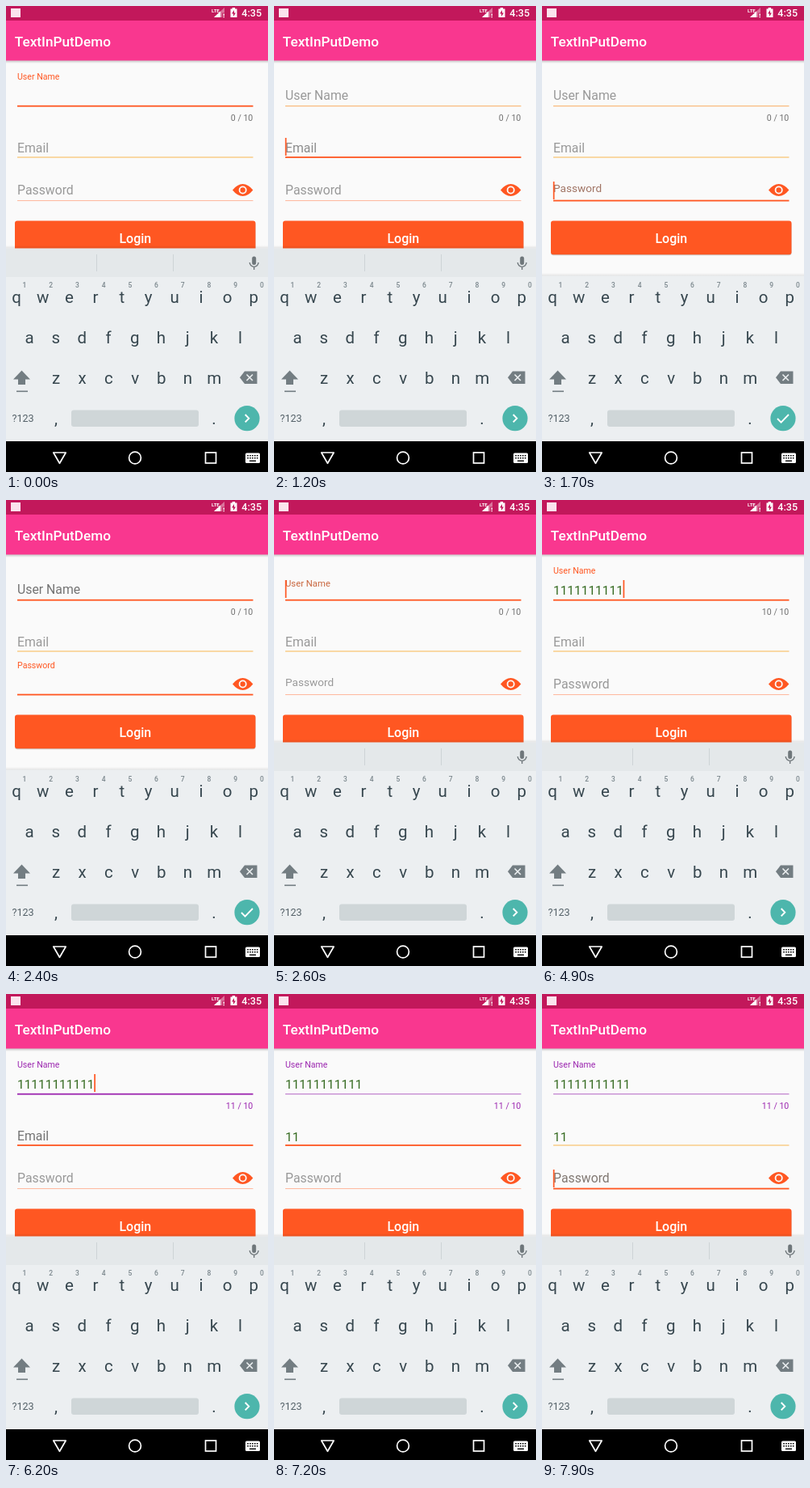
Animation, 325 px wide and 576 px high, one loop 8 s. Source, as an HTML page:

```html
<!DOCTYPE html>
<html lang="en">
<head>
<meta charset="utf-8">
<title>Text input demo</title>
<style>
html, body { margin: 0; width: 100%; height: 100%; overflow: hidden; background: #fafafa; }
svg { display: block; width: 325px; height: 576px; font-family: Roboto, "Noto Sans", sans-serif; }
.mid { text-anchor: middle; }
.key { font-size: 20.5px; fill: #37474f; text-anchor: middle; }
.num { font-size: 8.5px; font-weight: 500; fill: #7b878d; text-anchor: middle; }
.typed { font-size: 15.46px; fill: #33691e; }
</style>
</head>
<body>
<svg viewBox="0 0 325 576">
  <defs>
    <linearGradient id="down" x2="0" y2="1">
      <stop stop-color="#000" stop-opacity=".2"/><stop offset="1" stop-color="#000" stop-opacity="0"/>
    </linearGradient>
    <linearGradient id="up" x2="0" y2="1">
      <stop stop-color="#000" stop-opacity="0"/><stop offset="1" stop-color="#000" stop-opacity=".1"/>
    </linearGradient>
  </defs>
  <rect width="325" height="576" fill="#fafafa"/>

  <!-- status bar and title -->
  <rect width="325" height="18" fill="#c2185b"/>
  <rect x="6" y="3" width="12" height="11" fill="#fbe3ed"/>
  <g fill="#fff">
    <text x="255" y="7.5" font-size="6" font-weight="700">LTE</text>
    <path d="M258 14L271 2V14Z" fill-opacity=".4"/>
    <path d="M258 14L266 6.6V14Z"/>
    <path d="M268.2 8.5h3.3v6h-3.3z" fill="#c2185b"/>
    <path d="M269.5 9.5h1.4v2.7h-1.4zM269.5 13h1.4v1.2h-1.4z"/>
    <path d="M278.5 3.5h2.2V2h3.4v1.5h2.4V14h-8z"/>
    <path d="M283 5l-3 4.4h2V13l3-4.6h-2z" fill="#c2185b"/>
    <text x="292.3" y="13.3" font-size="12.6" font-weight="500">4:35</text>
  </g>
  <rect y="18" width="325" height="49.5" fill="#f9378f"/>
  <rect y="67.5" width="325" height="3.5" fill="url(#down)"/>
  <text x="10.8" y="50" font-size="17.2" font-weight="500" fill="#fff">TextInPutDemo</text>

  <!-- form -->
  <g id="form"></g>
  <text id="count" x="306.3" y="142" font-size="10.6" text-anchor="end"></text>
  <path d="M281 227.5Q287 220 293.7 220T306.4 227.5Q300.4 235 293.7 235T281 227.5Z" fill="#ff5722"/>
  <circle cx="293.7" cy="227.5" r="4.1" fill="#ff5722" stroke="#fafafa" stroke-width="1.8"/>
  <rect x="11" y="267" width="298.5" height="41.3" rx="3" fill="#000" opacity=".2"/>
  <rect x="11" y="265.5" width="298.5" height="41.7" rx="3" fill="#ff5722"/>
  <text class="mid" x="160.3" y="293" font-size="16" font-weight="500" fill="#fff">Login</text>

  <!-- keyboard -->
  <rect y="330" width="325" height="4" fill="url(#up)"/>
  <rect y="333.5" width="325" height="205" fill="#eceff1"/>
  <g id="bar">
    <rect y="296" width="325" height="3.5" fill="url(#up)"/>
    <rect y="299.5" width="325" height="35.5" fill="#e4e8ea"/>
    <path d="M112.5 307v21M207.5 307v21" stroke="#cdd3d6"/>
    <rect x="305.2" y="309.5" width="5" height="10.5" rx="2.5" fill="#6f777b"/>
    <path d="M302.3 317a5.4 5.4 0 0 0 10.8 0M307.7 322.4v3.6" fill="none" stroke="#6f777b" stroke-width="1.4"/>
  </g>
  <g id="keys"></g>
  <path d="M19.5 450.5L30 461.5H24V468H15V461.5H9Z" fill="#737d82"/>
  <path d="M13 476.3h14" stroke="#737d82" stroke-width="1.6"/>
  <path d="M296 451.5h15.5v15.5H296l-6-7.75z" fill="#737d82"/>
  <path d="M298.5 455.5l7.5 7.5m0-7.5l-7.5 7.5" stroke="#eceff1" stroke-width="1.6"/>
  <text x="7.5" y="514.3" font-size="12.6" fill="#546168">?123</text>
  <rect x="81" y="499.5" width="158" height="20.5" rx="3" fill="#cfd6d8"/>
  <circle cx="299" cy="509.7" r="15.6" fill="#4db6ac"/>
  <path id="enter" fill="none" stroke="#fff" stroke-width="1.9"/>

  <!-- navigation -->
  <rect y="538" width="325" height="38" fill="#000"/>
  <g fill="none" stroke="#fff" stroke-width="1.7">
    <path d="M58.8 552h15.4l-7.7 13.3z" stroke-linejoin="round"/>
    <circle cx="160" cy="558.5" r="7.4"/>
    <rect x="247.5" y="552" width="13" height="13"/>
  </g>
  <rect x="297" y="552.5" width="18" height="12.5" rx="1.5" fill="#fff"/>
  <path d="M299.3 555.7h13.5M299.3 558.8h13.5" stroke="#000" stroke-width="1.5" stroke-dasharray="1.6 1.3"/>
  <path d="M302 562.3h8" stroke="#000" stroke-width="1.4"/>
</svg>
<script>
const LOOP = 8000, LEFT = 14, DIGIT = 8.68;
const ACCENT = '#ff5722', GREY = '#999', DARK = '#737373', PURPLE = '#9c27b0';
const byId = id => document.getElementById(id);

function add(parent, tag, attrs, text = '') {
  const el = document.createElementNS('http://www.w3.org/2000/svg', tag);
  set(el, attrs);
  el.textContent = text;
  parent.append(el);
  return el;
}
function set(el, attrs) {
  for (const k in attrs) el.setAttribute(k, attrs[k]);
}

// keyboard letters
const PITCH = 32.7;
[['qwertyuiop', 13, 366.5], ['asdfghjkl', 29, 416.7], ['zxcvbnm', 62, 466.7]].forEach(([row, x0, y], r) =>
  [...row].forEach((c, i) => {
    const x = x0 + i * PITCH;
    add(byId('keys'), 'text', { class: 'key', x, y }, c);
    if (r === 0) add(byId('keys'), 'text', { class: 'num', x: x + 10, y: 348 }, (i + 1) % 10);
  }));
add(byId('keys'), 'text', { class: 'key', x: 62, y: 516.5 }, ',');
add(byId('keys'), 'text', { class: 'key', x: 258, y: 516.5 }, '.');

// form fields
function field(name, base, line, caretTop, thin) {
  const form = byId('form');
  return {
    base, line, thin,
    label: add(form, 'text', { x: LEFT }, name),
    rule: add(form, 'rect', { x: LEFT, width: 292.5 }),
    typed: add(form, 'text', { class: 'typed', x: LEFT, y: base + .7 }),
    caret: add(form, 'rect', { y: caretTop, width: 1.7, height: 22, fill: ACCENT })
  };
}
const fields = {
  user: field('User Name', 116, 123.7, 99, '#f9ac60'),
  mail: field('Email', 180.8, 187, 163, '#f9b850'),
  pass: field('Password', 233, 240.6, 217, '#ffb59b')
};

// label poses: [font size, rise above resting baseline]
const REST = [15.8, 0], LOW = [13.6, 3], HIGH = [11.3, 9], TOP = [10.6, 25];

// each row changes part of the state from its time on
const steps = [
  [0, { caret: '', focus: 'user', user: TOP, mail: REST, pass: REST, userInk: ACCENT, mailInk: GREY,
        passInk: GREY, n: 0, m: 0, bar: true }],
  [200, { caret: 'user' }],
  [600, { caret: '' }],
  [1000, { caret: 'user' }],
  [1100, { focus: 'user mail', user: LOW, userInk: '#b08070', mailInk: DARK }],
  [1200, { caret: 'mail', focus: 'mail', user: REST, userInk: GREY, mailInk: '#8c8c8c' }],
  [1500, { focus: 'mail pass', passInk: DARK }],
  [1600, { caret: 'pass', focus: 'pass', mailInk: GREY, passInk: '#807470' }],
  [1700, { pass: LOW, passInk: '#a07464', bar: false }],
  [1800, { pass: [10.9, 18], passInk: '#dd6239' }],
  [1900, { pass: TOP, passInk: ACCENT }],
  [2100, { caret: '' }],
  [2400, { focus: 'user pass', userInk: DARK }],
  [2500, { caret: 'user', focus: 'user', user: LOW, userInk: '#a07464', pass: HIGH, passInk: '#bb8470' }],
  [2600, { user: HIGH, userInk: '#c9673f', pass: LOW, passInk: GREY, bar: true }],
  [2700, { user: TOP, userInk: ACCENT, pass: REST }],
  [3000, { caret: '' }],
  [3400, { caret: 'user', n: 1 }],
  [3500, { n: 2 }],
  [3700, { n: 3 }],
  [3800, { n: 4 }],
  [3900, { n: 5 }],
  [4100, { n: 6 }],
  [4200, { n: 7 }],
  [4300, { n: 8 }],
  [4400, { n: 9 }],
  [4900, { n: 10 }],
  [5100, { n: 11, userInk: PURPLE }],
  [5600, { caret: '' }],
  [6100, { caret: 'user' }],
  [6200, { focus: 'user mail', mailInk: DARK }],
  [6300, { caret: 'mail', focus: 'mail' }],
  [6500, { m: 1 }],
  [6800, { m: 2 }],
  [7200, { caret: '' }],
  [7700, { caret: 'mail' }],
  [7800, { focus: 'mail pass', passInk: DARK }],
  [7900, { caret: 'pass', focus: 'pass', passInk: '#807872' }]
];

function draw(time) {
  const s = Object.assign({}, ...steps.filter(([t]) => t <= time).map(row => row[1]));
  const over = s.n > 10;
  const counts = { user: s.n, mail: s.m, pass: 0 };
  for (const name in fields) {
    const f = fields[name], [size, rise] = s[name], n = counts[name];
    const focused = s.focus.includes(name), purple = over && name === 'user';
    const h = focused ? 1.8 : 1;
    set(f.label, { 'font-size': size, y: f.base - rise, fill: s[name + 'Ink'],
      visibility: n && name === 'mail' ? 'hidden' : 'visible' });
    set(f.rule, { y: f.line - h / 2, height: h,
      fill: focused ? (purple ? PURPLE : ACCENT) : (purple ? '#b568c5' : f.thin) });
    set(f.caret, { x: LEFT - .2 + n * DIGIT, visibility: s.caret === name ? 'visible' : 'hidden' });
    f.typed.textContent = '1'.repeat(n);
  }
  byId('count').textContent = s.n + ' / 10';
  set(byId('count'), { fill: over ? PURPLE : '#707070' });
  set(byId('bar'), { visibility: s.bar ? 'visible' : 'hidden' });
  set(byId('enter'), { d: s.bar ? 'M296.7 505l4.6 4.7l-4.6 4.7' : 'M292 510l4.6 4.6l9.4-9.6' });
}

const start = performance.now();
function tick() {
  draw((performance.now() - start) % LOOP);
  requestAnimationFrame(tick);
}
tick();
</script>
</body>
</html>
```
